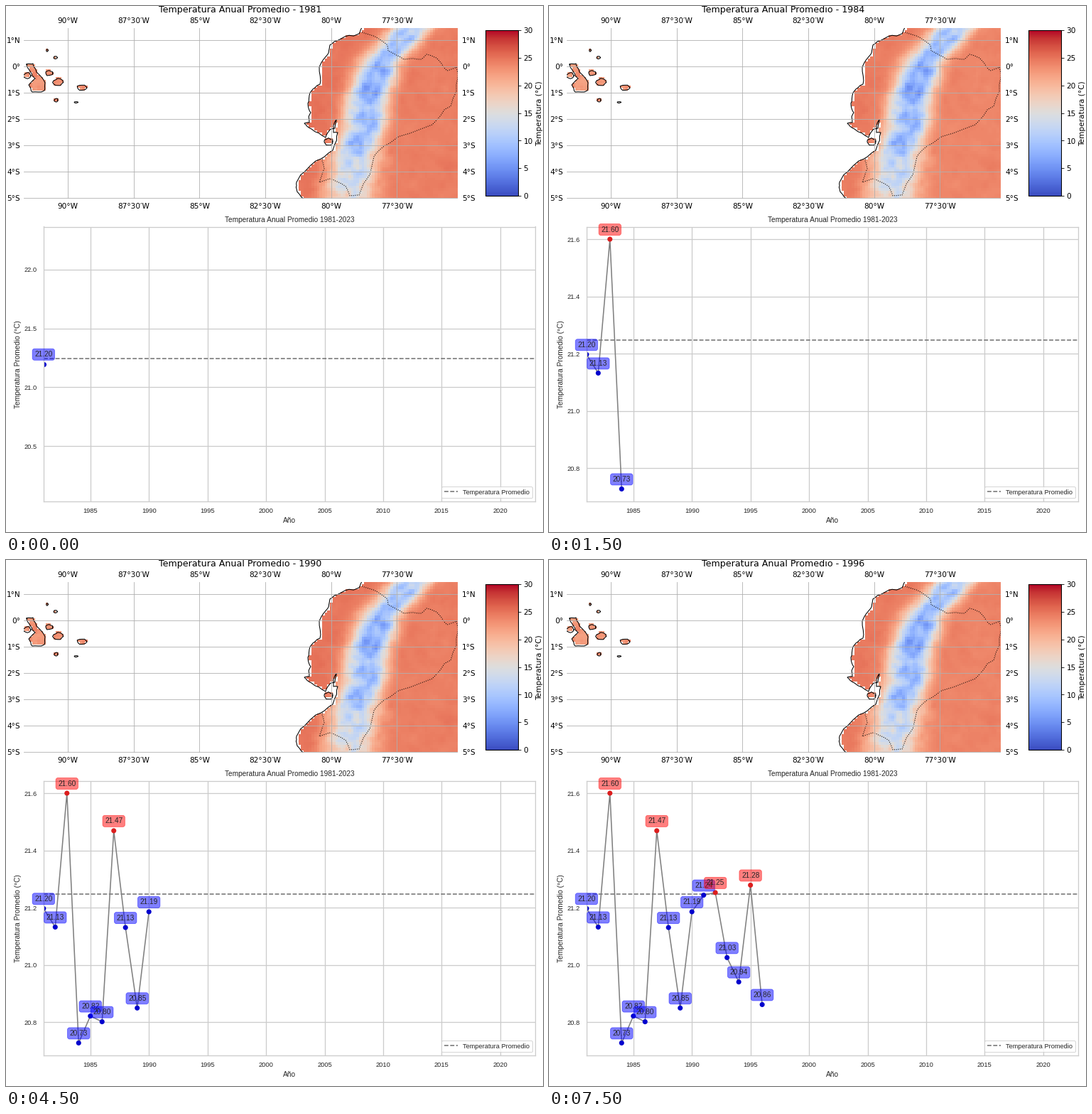
A matplotlib script for the animation above (8000 ms loop, 756 by 740 pixels).

```python
import numpy as np
import matplotlib.pyplot as plt
from matplotlib.animation import FuncAnimation
from matplotlib.path import Path

W, H = 756, 740
PT = 1.05  # pixels per point
FIRST = 1981
MEAN = 21.2467
TEMPS = [21.1975, 21.1326, 21.600, 20.728, 20.822, 20.802, 21.469, 21.131,
         20.850, 21.186, 21.244, 21.253, 21.026, 20.941, 21.279, 20.862]
YEARS = FIRST + np.arange(len(TEMPS))
SANS = "Liberation Sans"
INK, PALE = "0.15", "0.8"

# Key points in stage pixels; the detail between them is generated
COAST = [(501, 29), (497, 39), (470, 47), (456, 55), (453, 68), (441, 86),
         (442, 110), (428, 122), (425, 137), (429, 150), (427, 164),
         (420, 165), (430, 173), (450, 185), (463, 172), (465, 160),
         (461, 178), (467, 178), (460, 203), (436, 218), (409, 248),
         (409, 257), (420, 272)]
BORDER = [(501, 37), (536, 54), (538, 63), (560, 75), (585, 75), (592, 68),
          (606, 73), (621, 91), (634, 86), (634, 120), (626, 141), (600, 167),
          (540, 193), (518, 212), (497, 266), (484, 267), (474, 251),
          (455, 243), (441, 248), (448, 229), (446, 213)]
ISABELA = [(29, 82), (38, 81), (43, 93), (55, 108), (54, 119), (37, 121),
           (32, 111), (41, 102), (34, 92), (29, 82)]
ISLETS = [(30, 98, 5, 4), (60.5, 94.5, 5, 3.5), (73, 107.5, 7, 5),
          (107, 115, 7, 4), (70.5, 132.5, 2.5, 2.5), (98.5, 135.5, 2.5, 1),
          (69.5, 72.5, 2.5, 1.8), (58, 62.5, 1.2, 1.7), (454, 191, 6, 5)]

rng = np.random.default_rng(7)


def box(x0, y0, x1, y1):
    return [x0 / W, 1 - y1 / H, (x1 - x0) / W, (y1 - y0) / H]


def lon_x(lon):
    return 87 + 37.06 * (lon + 90)


def lat_y(lat):
    return 84.6 - 37.08 * lat


def rough(points, amount=0.07):
    """Split each segment twice, shifting midpoints in proportion to length."""
    p = np.array(points, float)
    for _ in range(2):
        step = np.diff(p, axis=0)
        size = np.hypot(*step.T)[:, None]
        out = np.empty((2 * len(p) - 1, 2))
        out[::2] = p
        out[1::2] = p[:-1] + step / 2 + rng.normal(0, amount, step.shape) * size
        p = out
    return p


def islet(cx, cy, rx, ry):
    a = np.linspace(0, 2 * np.pi, 13)
    r = rng.uniform(0.85, 1.15, a.size)
    r[-1] = r[0]
    return np.column_stack([cx + rx * r * np.cos(a), cy + ry * r * np.sin(a)])


def soft_noise(shape, rounds):
    n = rng.normal(size=shape)
    for _ in range(rounds):
        for axis in (0, 1):
            n = (np.roll(n, 1, axis) + 2 * n + np.roll(n, -1, axis)) / 4
    return n / n.std()


def climate(x, y):
    """Mean temperature: warm lowlands cut by a cold mountain range."""
    d = x - np.interp(y, [31, 75, 130, 165, 205, 270], [573, 531, 510, 508, 492, 480])
    north = np.clip((75 - y) / 44, 0, 1)
    south = 1 / (1 + np.exp((205 - y) / 12))
    depth = 16.5 - 3 * north - 5 * south
    width = np.where(d < 0, 30 + 2 * south, 26 + 11 * south)
    cold = np.exp(-(np.abs(d) / width) ** 2.5)
    valley = 2 * np.exp(-(d / 5) ** 2) * (1 - north) * (1 - south)
    t = 24.4 + 0.6 / (1 + np.exp(d / 12)) - depth * cold + valley
    t += soft_noise(x.shape, 1) * (0.1 + 1.1 * cold)
    t += soft_noise(x.shape, 6) * (0.15 + 1.2 * cold)
    return np.where(x < 200, 23 + 0.6 * soft_noise(x.shape, 1), t)


coast, border = rough(COAST), rough(BORDER, 0.05)
isles = [rough(ISABELA)] + [islet(*spec) for spec in ISLETS]
lons = np.arange(-91.7, -75.1, 0.1)
lats = np.arange(1.5, -5.05, -0.1)
gx, gy = np.meshgrid(lon_x(lons), lat_y(lats))
cells = np.column_stack([gx.ravel(), gy.ravel()])
mainland = Path(np.vstack([coast, [(660, 280), (660, 20), (501, 20)]]))
land = mainland.contains_points(cells) & mainland.contains_points(cells - [2.5, 0])
for isle in isles:
    land |= Path(isle).contains_points(cells)
field = np.ma.masked_where(~land.reshape(gx.shape), climate(gx, gy))

fig = plt.figure(figsize=(W / 72, H / 72), dpi=72, facecolor="white")


def label(x, y, s, size=10, **kw):
    return fig.text(x / W, 1 - y / H, s, fontsize=size * PT, color="black", **kw)


# Map
geo = fig.add_axes(box(25, 31, 635.5, 270.5))
geo.axis("off")
extent = [lon_x(lons[0] - 0.05), lon_x(lons[-1] + 0.05),
          lat_y(lats[-1] - 0.05), lat_y(lats[0] + 0.05)]
heat = geo.imshow(field, cmap="coolwarm", vmin=0, vmax=30, extent=extent,
                  aspect="auto", interpolation="nearest")
geo.set_xlim(25, 635.5)
geo.set_ylim(270.5, 31)
for shape in [coast] + isles:
    geo.plot(*shape.T, color="black", lw=PT)
geo.plot(*border.T, color="black", lw=PT, ls=":")

for lon in np.arange(-90, -77, 2.5):
    minutes = "30′" if lon % 1 else ""
    geo.axvline(lon_x(lon), color="#b0b0b0", lw=0.8 * PT, zorder=3)
    for y in (24, 285):
        label(lon_x(lon), y, f"{int(-lon)}°{minutes}W", ha="center")
for lat in range(1, -6, -1):
    side = "N" if lat > 0 else "S" if lat < 0 else ""
    geo.axhline(lat_y(lat), color="#b0b0b0", lw=0.8 * PT, zorder=3)
    for x, ha in ((20, "right"), (642, "left")):
        label(x, lat_y(lat) + 4, f"{abs(lat)}°{side}", ha=ha)
heading = label(330, 9, "", 12, ha="center")

bar = fig.colorbar(heat, cax=fig.add_axes(box(674.5, 34.5, 721, 267)))
bar.set_ticks(range(0, 31, 5))
bar.ax.tick_params(labelsize=10 * PT, length=3.5 * PT, pad=3.5 * PT, width=0.8 * PT)
bar.set_label("Temperatura (°C)", fontsize=10 * PT, labelpad=4 * PT)
bar.outline.set_linewidth(PT)

# Yearly series
RIGHT, TOP, BOTTOM = 745.3, 310.5, 697
ax = fig.add_axes(box(52.8, TOP, RIGHT, BOTTOM))
ax.set_axisbelow(True)
ax.grid(color=PALE, lw=1.3)
ax.tick_params(length=0, pad=8.3 * PT, labelsize=8.8 * PT, labelcolor=INK,
               labelfontfamily=SANS)
ax.ticklabel_format(useOffset=False)
for spine in ax.spines.values():
    spine.set(color=PALE, linewidth=1.3)
text = dict(fontsize=9.6 * PT, color=INK, family=SANS)
ax.set_title("Temperatura Anual Promedio 1981-2023", pad=6 * PT, **text)
ax.set_xlabel("Año", labelpad=4 * PT, **text)
ax.set_ylabel("Temperatura Promedio (°C)", labelpad=4 * PT, **text)
ax.axhline(MEAN, color="0.45", ls="--", lw=1.5 * PT, label="Temperatura Promedio")
line, = ax.plot([], [], color="gray", lw=1.5 * PT)
dots = ax.scatter([], [], s=50, linewidths=0, zorder=2.4)
ax.legend(loc="lower right", prop=dict(family=SANS, size=8.8 * PT), labelcolor=INK,
          edgecolor=PALE, framealpha=0.8)
ax.set_xlim(FIRST, 2023)

warm = [t > MEAN for t in TEMPS]
dot_colors = ["#dc1e1e" if w else "#0000cd" for w in warm]
tags = [ax.annotate(f"{t:.2f}", (year, t), xytext=(0, 10 * PT),
                    textcoords="offset points", ha="center",
                    bbox=dict(boxstyle="round,pad=0.3", alpha=0.5, lw=0.8 * PT,
                              color="red" if w else "blue"), **text)
        for year, t, w in zip(YEARS, TEMPS, warm)]


def update(i):
    seen = TEMPS[:i + 1]
    heading.set_text(f"Temperatura Anual Promedio - {YEARS[i]}")
    heat.set_data(field + (TEMPS[i] - MEAN))

    if i == 0:
        lo, hi = seen[0] * 0.945, seen[0] * 1.055
    else:
        lo, hi = min(seen + [MEAN]), max(seen + [MEAN])
        margin = 0.05 * (hi - lo)
        lo, hi = lo - margin, hi + margin
    ax.set_ylim(lo, hi)
    # Two-decimal tick labels need a wider left margin
    ax.set_position(box(58.2 if hi - lo < 0.3 else 52.8, TOP, RIGHT, BOTTOM))

    line.set_data(YEARS[:i + 1], seen)
    dots.set_offsets(np.column_stack([YEARS[:i + 1], seen]))
    dots.set_facecolor(dot_colors[:i + 1])
    for k, tag in enumerate(tags):
        tag.set_visible(k <= i)
    return []


anim = FuncAnimation(fig, update, frames=len(TEMPS), init_func=lambda: update(0),
                     interval=500, repeat=True, repeat_delay=0, blit=False)
plt.show()
```
